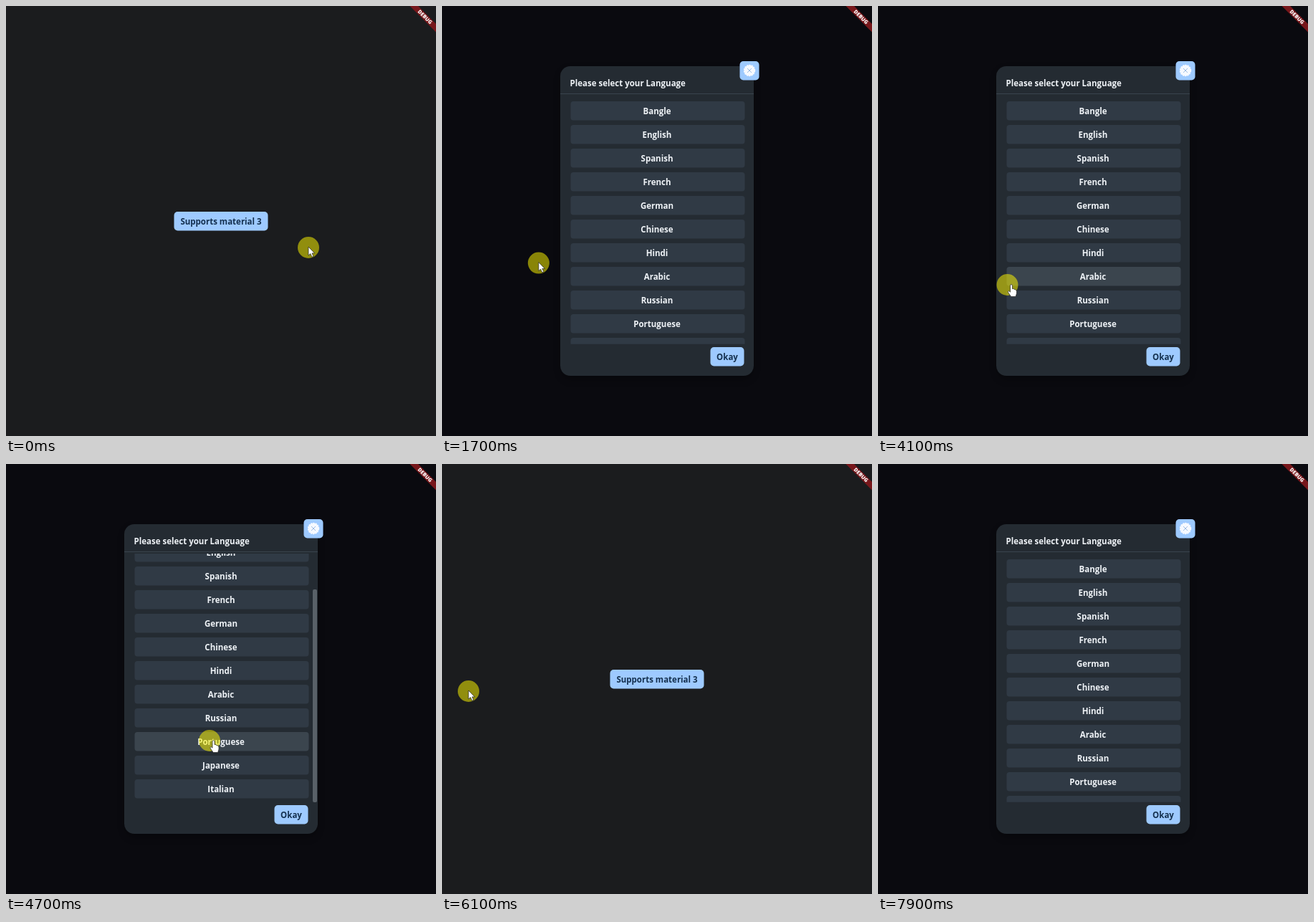
These frames come from a looping animation (600 by 600 pixels, 8 s). An HTML page:

```html
<!DOCTYPE html>
<html lang="en">
<head>
<meta charset="utf-8">
<title>Language dialog</title>
<style>
  html, body { margin: 0; width: 100%; height: 100%; overflow: hidden; background: #1b1c1e; }
  svg { display: block; width: 600px; height: 600px; }
  text { font: 700 11.5px "Open Sans", "Noto Sans", sans-serif; fill: #eef2f6; }
  .mid { text-anchor: middle; }
  .btn { fill: #9ecaff; }
  .dark { fill: #14304f; }
  .debug { font-size: 7.2px; font-weight: 800; fill: #fff; }
  .pointer { fill: #fff; stroke: #222; stroke-width: .7; }
</style>
</head>
<body>
<svg viewBox="0 0 600 600">
  <defs>
    <clipPath id="view"><rect x="165" y="125" width="270" height="346.8"/></clipPath>
    <filter id="soft" x="-20%" y="-20%" width="140%" height="140%"><feGaussianBlur stdDeviation="6"/></filter>
  </defs>
  <rect width="600" height="600" fill="#1b1c1e"/>
  <rect class="btn" x="234.5" y="287" width="131" height="26.5" rx="5"/>
  <text class="mid dark" x="300" y="305">Supports material 3</text>

  <rect id="scrim" width="600" height="600" fill="#000107"/>
  <g id="dialog">
    <rect x="167" y="90" width="266" height="430" rx="14" opacity=".35" filter="url(#soft)"/>
    <rect x="165" y="84" width="270" height="432" rx="14" fill="#242b32"/>
    <text x="178.5" y="111.5">Please select your Language</text>
    <path d="M165 122.5H435" stroke="#3a444d"/>
    <g clip-path="url(#view)"><g id="list"></g></g>
    <rect id="bar" x="428" width="6" height="297" rx="2" fill="#596168"/>
    <rect class="btn" x="374.5" y="476" width="47" height="26.5" rx="5"/>
    <text class="mid dark" x="398" y="494">Okay</text>
    <rect class="btn" x="415.5" y="77" width="27" height="26.5" rx="5"/>
    <circle cx="429" cy="90" r="7.4" fill="#f6f9ff" stroke="#f6f9ff" stroke-width="1.6" stroke-dasharray="2.2 1.2"/>
    <path d="M426 87l6 6m0-6l-6 6" stroke="#9dbce4"/>
  </g>

  <g transform="translate(600 0) rotate(45)">
    <rect x="-30" y="17.6" width="60" height="8.2" fill="#77171b"/>
    <text class="mid debug" y="24.2">DEBUG</text>
  </g>

  <g id="cursor">
    <circle r="15" fill="#fff700" fill-opacity=".52"/>
    <path id="arrow" class="pointer" d="M0-1V11L2.8 8.6 5 13.3 7 12.3 5 7.9H8.6Z"/>
    <path id="hand" class="pointer" d="M4 1.2Q4-.4 5.5-.4T7 1.2V5.6Q9 5 9.5 6.4 11.3 5.9 11.7 7.4 13 7.4 13 9V12L11.6 16.5H5.2L1.2 10.8Q.5 9 2.2 8.6L4 10.2Z"/>
  </g>
</svg>
<script>
  const LOOP = 8000, STEP = 100, PITCH = 33, TOP = 133, ROW_H = 26.5, MAX_SCROLL = 56;
  const names = "Bangle English Spanish French German Chinese Hindi Arabic Russian Portuguese Japanese Italian".split(" ");

  // The cursor rests at each stop until `leave`, then glides to the next.
  const stops = [
    { arrive: 0, leave: 100, x: 422, y: 337 },       // start
    { arrive: 900, leave: 1200, x: 348.5, y: 309 },  // click the button
    { arrive: 2100, leave: 2960, x: -18, y: 394 },   // off stage
    { arrive: 3800, leave: 3900, x: 77, y: 392 },
    { arrive: 4300, leave: 5280, x: 284, y: 386 },   // scroll the list
    { arrive: 6100, leave: 6100, x: 37, y: 317 },    // click beside the dialog
    { arrive: 6800, leave: 7000, x: 347, y: 293 },   // click the button again
    { arrive: 7500, leave: LOOP, x: -20, y: 380 }
  ];

  const $ = id => document.getElementById(id);
  const set = (id, name, value) => $(id).setAttribute(name, value);
  const mix = (a, b, k) => a + (b - a) * k;
  const inside = (x, y, l, t, r, b) => x >= l && x <= r && y >= t && y <= b;

  function ramp(t, from, length) {
    const k = Math.min(1, Math.max(0, (t - from) / length));
    return k * k * (3 - 2 * k);
  }

  function make(tag, attrs) {
    const el = document.createElementNS("http://www.w3.org/2000/svg", tag);
    for (const k in attrs) el.setAttribute(k, attrs[k]);
    return $("list").appendChild(el);
  }

  const rows = names.map((name, i) => {
    const y = TOP + i * PITCH;
    const row = make("rect", { x: 179.5, y, width: 243, height: ROW_H, rx: 4 });
    make("text", { class: "mid", x: 300, y: y + 18.3 }).textContent = name;
    return row;
  });

  function pointer(t) {
    const i = stops.findLastIndex(s => s.arrive <= t);
    const a = stops[i], b = stops[i + 1] || a;
    const k = ramp(t, a.leave, b.arrive - a.leave);
    return [mix(a.x, b.x, k), mix(a.y, b.y, k)];
  }

  function draw(t) {
    const [x, y] = pointer(t);
    const open = ramp(t, 1200, 300) - ramp(t, 5800, 300) + ramp(t, 7000, 300);
    const scroll = MAX_SCROLL * (ramp(t, 4300, 300) - ramp(t, 4800, 200));

    set("scrim", "opacity", 0.64 * open);
    set("dialog", "opacity", open);
    set("list", "transform", `translate(0 ${-scroll})`);
    set("bar", "y", 126 + scroll * 0.875);
    set("bar", "opacity", ramp(t, 4200, 200) - ramp(t, 5300, 300));

    const pos = y + scroll - TOP;
    const onRow = open > 0.9 && inside(x, y, 180, 125, 422, 472) && pos % PITCH < ROW_H;
    const hit = onRow ? Math.floor(pos / PITCH) : -1;
    rows.forEach((r, i) => r.setAttribute("fill", i === hit ? "#3b454e" : "#303a45"));

    const hand = onRow || (open < 0.1 && inside(x, y, 234, 287, 366, 314));
    set("hand", "visibility", hand ? "visible" : "hidden");
    set("arrow", "visibility", hand ? "hidden" : "visible");
    set("cursor", "transform", `translate(${x} ${y})`);
  }

  const start = performance.now();
  function tick() {
    const t = (performance.now() - start) % LOOP;
    draw(Math.floor(t / STEP) * STEP);
    requestAnimationFrame(tick);
  }
  tick();
</script>
</body>
</html>
```
